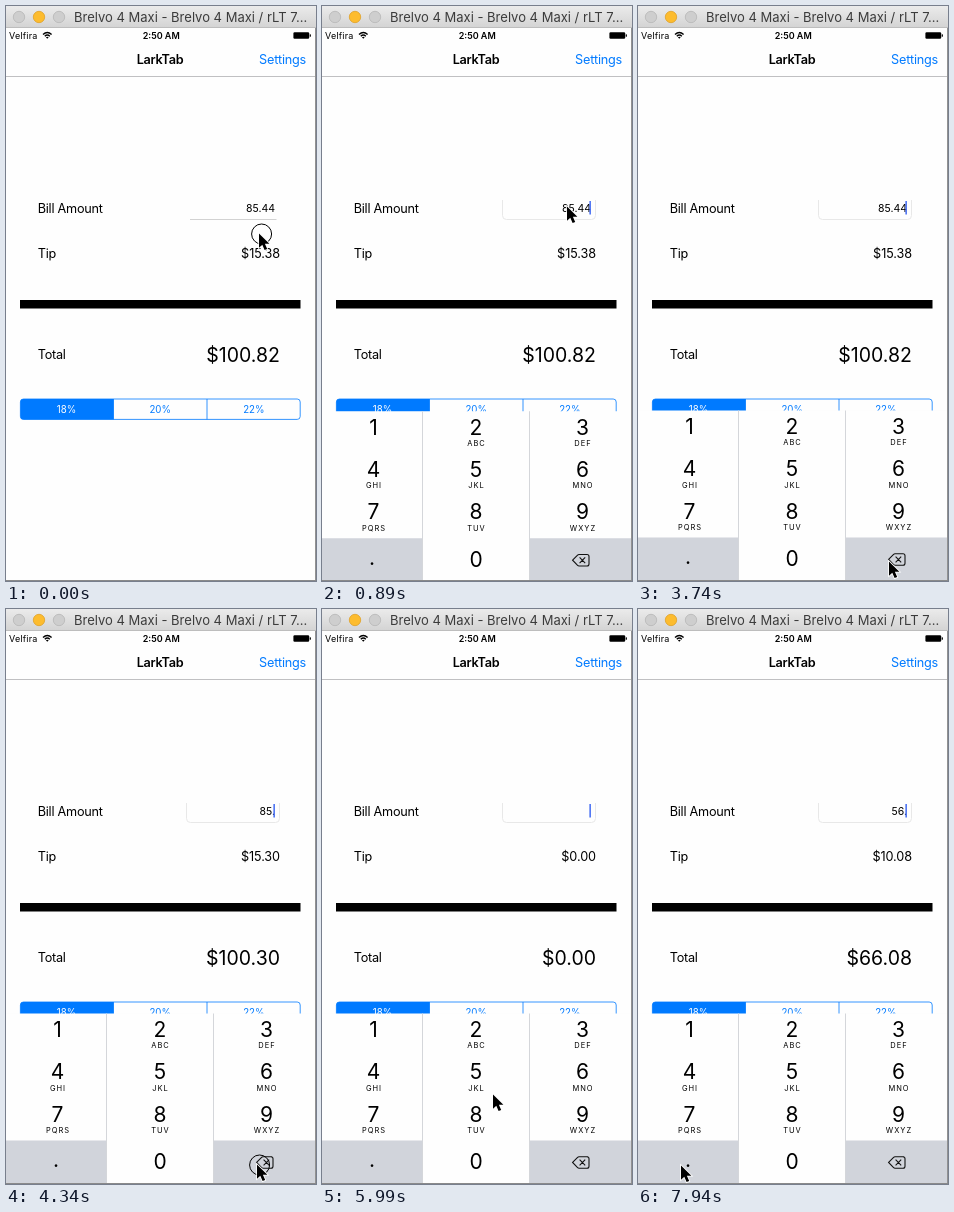
An HTML page that plays this animation: 310x575 px, repeating every 8 s.

```html
<!DOCTYPE html>
<html lang="en">
<head>
<meta charset="utf-8">
<title>Tip calculator</title>
<style>
  html, body { margin: 0; width: 100%; height: 100%; overflow: hidden; background: #fff; }
  svg { display: block; width: 100vw; height: 100vh; }
  text { font-family: Inter, "Liberation Sans", sans-serif; white-space: pre; }
</style>
</head>
<body>
<svg id="stage" viewBox="0 0 310 575">
  <defs>
    <linearGradient id="chrome" x2="0" y2="1">
      <stop offset="0" stop-color="#ebebeb"/>
      <stop offset="1" stop-color="#d3d3d3"/>
    </linearGradient>
  </defs>
  <rect width="310" height="575" fill="#fefefe"/>

  <g id="app">
    <path d="M0 70.5H309" stroke="#c0c0c2"/>
    <g fill="none" stroke="#000" stroke-width="1.4">
      <path d="M37 28.4Q41.3 24.4 45.6 28.4M38.8 30.3Q41.3 27.9 43.8 30.3"/>
      <path d="M39.9 31.2L41.3 32.8L42.7 31.2Q41.3 30.2 39.9 31.2Z" fill="#000" stroke="none"/>
    </g>
    <rect x="287.4" y="26.2" width="15.8" height="6.5" rx="1.2"/>
    <rect x="303.7" y="28.2" width="1.2" height="2.6" rx=".5"/>
    <path id="underline" d="M184 213.5H270.5" stroke="#d2d2d2"/>
    <path id="field" d="M180.5 194V209.5Q180.5 213.5 184.5 213.5H269.5Q273.5 213.5 273.5 209.5V194"
          fill="none" stroke="#e8e8e8"/>
    <rect x="14" y="294" width="280.5" height="8.5"/>
    <path d="M107.5 393H17.4Q14.4 393 14.4 396V410.4Q14.4 413.4 17.4 413.4H107.5Z" fill="#007aff"/>
    <rect x="14.4" y="393" width="279.8" height="20.4" rx="3" fill="none" stroke="#007aff" stroke-width=".8"/>
    <path d="M107.5 393V413.4M201 393V413.4" stroke="#007aff" stroke-width=".8"/>
  </g>
  <rect id="caret" x="267.4" y="195" width="1.5" height="13.5" fill="#426bf2"/>

  <g id="keyboard">
    <rect y="404.5" width="310" height="171" fill="#fefefe"/>
    <path d="M0 531.6H100.5V575H0ZM207.5 531.6H310V575H207.5Z" fill="#d1d4db"/>
    <path d="M100.5 404.5V575M207.5 404.5V575" stroke="#d4d6da"/>
    <path d="M250.6 553.4L255.6 548.4Q256.2 547.8 257 547.8H265Q267 547.8 267 549.8V557.2Q267 559.2 265 559.2H257Q256.2 559.2 255.6 558.6Z
             M257.6 550.7L263.2 556.3M263.2 550.7L257.6 556.3" fill="none" stroke="#111" stroke-width="1.1"/>
  </g>

  <g id="window">
    <rect width="310" height="22" fill="url(#chrome)"/>
    <path d="M0 21.5H310" stroke="#bdbdbd"/>
    <g stroke-width=".8">
      <circle cx="13" cy="11" r="5.7" fill="#cecece" stroke="#b6b6b6"/>
      <circle cx="33" cy="11" r="5.7" fill="#fdbc2e" stroke="#e0a128"/>
      <circle cx="53" cy="11" r="5.7" fill="#cecece" stroke="#b6b6b6"/>
    </g>
    <path d="M309.5 22V575" stroke="#929292"/>
    <path d="M0 574.5H310" stroke="#8a8a8a"/>
  </g>

  <g id="pointer">
    <circle id="tap" cx="1.6" cy="0" r="10" fill="none" stroke="#000"/>
    <path d="M-1 -.6V13.8L2.3 10.8L4.6 16.1L7.2 15L4.9 9.8H9.4Z"
          stroke="#fff" stroke-width="1.6" paint-order="stroke"/>
  </g>
</svg>
<script>
const LOOP = 8000;
const STEP = 150;
const RATE = 0.18;
const FOCUS = 4;
const $ = id => document.getElementById(id);

function label(parent, x, y, str, size, { anchor = 'start', fill = '#000', weight = 400, gap = 0 } = {}) {
  const el = document.createElementNS('http://www.w3.org/2000/svg', 'text');
  const attrs = { x, y, fill, 'font-size': size, 'font-weight': weight, 'text-anchor': anchor, 'letter-spacing': gap };
  for (const key in attrs) el.setAttribute(key, attrs[key]);
  el.textContent = str;
  $(parent).append(el);
  return el;
}

const BODY = 12.7;
const BLUE = '#007aff';
label('window', 68, 16, 'Brelvo 4 Maxi - Brelvo 4 Maxi / rLT 7...', 13, { fill: '#3c3c3c' });
label('app', 3, 33, 'Velfira', 9, { gap: 0.2 });
label('app', 155.2, 33, '2:50 AM', 9, { anchor: 'middle', weight: 600 });
label('app', 154, 58, 'LarkTab', BODY, { anchor: 'middle', weight: 600, gap: -0.3 });
label('app', 300, 58, 'Settings', BODY, { anchor: 'end', fill: BLUE, gap: -0.25 });
for (const [str, y] of [['Bill Amount', 207], ['Tip', 252], ['Total', 353]])
  label('app', 31.7, y, str, BODY, { gap: -0.25 });
['18%', '20%', '22%'].forEach((str, i) =>
  label('app', 60.6 + 93.6 * i, 406.5, str, 9.7, { anchor: 'middle', fill: i ? BLUE : '#fff' }));

const bill = label('app', 269, 206, '', 10.5, { anchor: 'end' });
const tip = label('app', 274, 252, '', BODY, { anchor: 'end', gap: -0.1 });
const total = label('app', 274, 355.5, '', 19.5, { anchor: 'end' });

const COLS = [51.5, 154, 260.5];
['', 'ABC', 'DEF', 'GHI', 'JKL', 'MNO', 'PQRS', 'TUV', 'WXYZ'].forEach((letters, i) => {
  const x = COLS[i % 3], y = 428 + 42.3 * Math.floor(i / 3);
  label('keyboard', x, y, i + 1, 21, { anchor: 'middle' });
  label('keyboard', x + 0.5, y + 11.2, letters, 7.5, { anchor: 'middle', gap: 1 });
});
label('keyboard', 50, 558, '.', 21, { anchor: 'middle' });
label('keyboard', COLS[1], 560, '0', 21, { anchor: 'middle' });

// [step, field text]
const edits = [[3, '85.44'], [27, '85.4'], [29, '85.'], [32, '85'], [35, '8'],
  [37, ''], [42, '5'], [46, '56'], [53, '56.']];
const taps = [0, 3, 27, 29, 32, 35, 37, 41, 45, 52];
// [step, x, y]
const path = [[0, 254, 228], [1, 253, 224], [3, 246, 199.5], [4, 246, 201], [20, 246, 201],
  [21, 250, 212], [22, 268, 280], [23, 294, 400], [24, 282, 515], [25, 252, 556], [38, 252, 556],
  [39, 216, 520], [40, 172, 486], [41, 167, 472], [42, 167, 472], [43, 200, 467], [44, 246, 465],
  [45, 262, 465], [46, 262, 465], [47, 200, 488], [48, 117, 513], [49, 76, 540], [50, 51, 555],
  [51, 44, 557], [53, 44, 557]];

function pointerAt(n) {
  const i = path.findIndex(p => p[0] >= n);
  const [n1, x1, y1] = path[i];
  if (n1 === n) return [x1, y1];
  const [n0, x0, y0] = path[i - 1];
  const k = (n - n0) / (n1 - n0);
  return [x0 + (x1 - x0) * k, y0 + (y1 - y0) * k];
}

// The caret stays solid after an edit, then blinks every seven steps.
function caretAt(n, lastEdit) {
  if (n < FOCUS) return 0;
  const idle = n - lastEdit - 4;
  return idle < 0 ? 1 : [0.5, 0, 0, 0.5, 1, 1, 1][idle % 7];
}

// Remaining distance of a critically damped slide.
function keyboardShift(n) {
  if (n < FOCUS) return 172;
  const w = 0.0183 * (n * STEP - 10 - 475);
  return 170 * (1 + w) * Math.exp(-w);
}

const money = v => '$' + v.toFixed(2);
const show = (id, on) => $(id).setAttribute('opacity', +on);

function draw(time) {
  const n = Math.min(53, Math.floor((time + (time > 500 ? 10 : 0)) / STEP));
  const [lastEdit, str] = edits.findLast(e => e[0] <= n) || edits[0];
  const amount = parseFloat(str) || 0;
  bill.textContent = str;
  tip.textContent = money(amount * RATE);
  total.textContent = money(amount * (1 + RATE));
  show('underline', n < FOCUS);
  show('field', n >= FOCUS);
  show('caret', caretAt(n, lastEdit));
  show('tap', taps.includes(n));
  $('keyboard').setAttribute('transform', `translate(0 ${keyboardShift(n).toFixed(2)})`);
  $('pointer').setAttribute('transform', `translate(${pointerAt(n)})`);
}

const start = performance.now();
function tick() {
  draw((performance.now() - start) % LOOP);
  requestAnimationFrame(tick);
}
tick();
</script>
</body>
</html>
```
